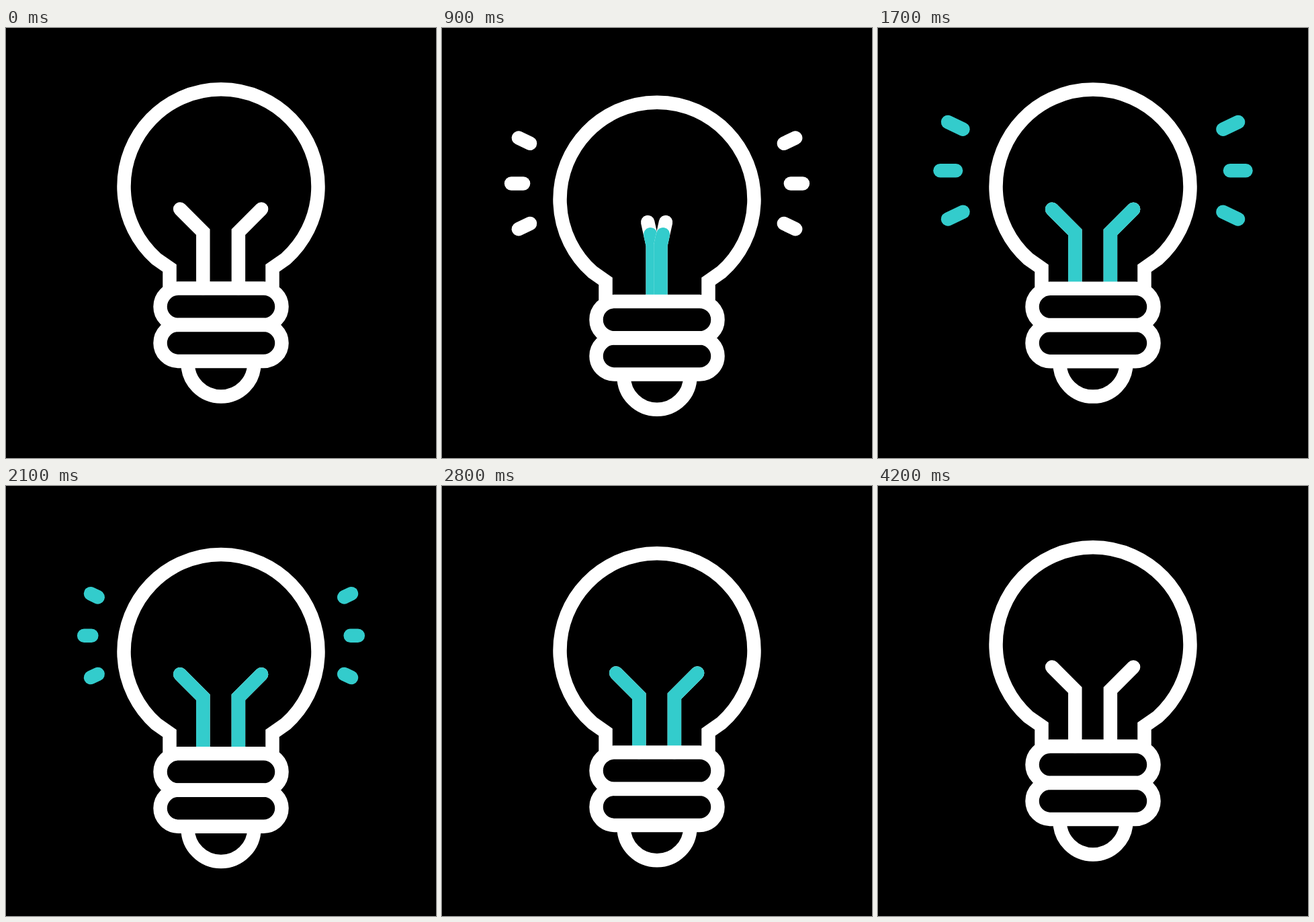
Recreate the animation shown at these times as an HTML page. Size 640 by 640 pixels, loop 4.3 s.

```html
<!DOCTYPE html>
<html lang="en">
<head>
<meta charset="utf-8">
<title>Light bulb</title>
<style>
  html, body { margin: 0; width: 100%; height: 100%; overflow: hidden; background: #000; }
  svg { display: block; width: 100vw; height: 100vh; }
  path, rect { fill: none; stroke-width: 20.5; }
  .white { stroke: #fff; }
  .teal { stroke: #3cc; }
  .round { stroke-linecap: round; }
</style>
</head>
<body>
<svg viewBox="0 0 640 640">
  <g id="lamp">
    <g id="rays"></g>
    <g id="wires"></g>
    <path class="white" d="M243.5 388V357.4L224 343.8A144.5 144.5 0 1 1 416 343.8L396.5 357.4V388"/>
    <rect class="white" x="229.5" y="387.5" width="181" height="54.5" rx="27.2"/>
    <rect class="white" x="229.5" y="441.8" width="181" height="54.2" rx="27.1"/>
    <path class="white" d="M270.6 496V499A49.4 49.4 0 0 0 369.4 499V496"/>
  </g>
</svg>
<script>
const LOOP = 4300, STEP = 100, DROP = 21.8;
const $ = id => document.getElementById(id);

const ramp = (t, a, b) => Math.min(1, Math.max(0, (t - a) / (b - a)));
const ease = (t, a, b) => (1 - Math.cos(Math.PI * ramp(t, a, b))) / 2;
const mix = (a, b, k) => a + (b - a) * k;

function addPath(parent, color) {
  const p = document.createElementNS("http://www.w3.org/2000/svg", "path");
  p.setAttribute("class", color + " round");
  p.setAttribute("pathLength", 1);
  parent.appendChild(p);
  return p;
}

// Shows only the first part of a path.
function trim(path, part) {
  path.style.display = part > 0.001 ? "" : "none";
  path.setAttribute("stroke-dasharray", part < 0.999 ? part + " 2" : "none");
}

const pair = parent => ["white", "teal"].map(c => addPath(parent, c));

// Each ray: birth point, inner end, outer end, as offsets from the axis.
const rays = [];
for (const side of [-1, 1]) {
  for (const [from, inner, outer] of [
    [[174, 158.5], [193.5, 150.5], [216, 139.8]],
    [[182.4, 212], [204, 212], [227.5, 212]],
    [[174, 265.5], [193.5, 273.5], [216, 284.2]]
  ]) rays.push({ side, from, inner, outer, paths: pair($("rays")) });
}

const wires = [-1, 1].map(side => ({ side, paths: pair($("wires")) }));

function draw(t) {
  const down = ease(t, 245, 1080);
  const drop = down - ease(t, 1080, 1740) + ease(t, 1740, 2470) - ease(t, 2470, 3060);
  $("lamp").setAttribute("transform", `translate(0 ${(DROP * drop).toFixed(2)})`);

  const spread = 1 - 0.875 * (down - ease(t, 1080, 1700));
  const glow = ease(t, 245, 1130) - ease(t, 3060, 4140);
  for (const { side, paths } of wires) {
    const x = d => (319.6 + side * d * spread).toFixed(2);
    const d = `M${x(26.3)} 387V303.8L${x(60.5)} 269.6`;
    paths.forEach(p => p.setAttribute("d", d));
    trim(paths[1], glow);
  }

  const grow = ramp(t, 280, 1090) - ramp(t, 1780, 2390);
  const tint = t < 1780 ? ease(t, 1090, 1650) : 1;
  for (const { side, from, inner, outer, paths } of rays) {
    const at = end => {
      const x = 320 + side * mix(from[0], end[0], grow);
      return `${x.toFixed(2)} ${mix(from[1], end[1], grow).toFixed(2)}`;
    };
    const d = `M${at(inner)}L${at(outer)}`;
    paths.forEach(p => p.setAttribute("d", d));
    trim(paths[0], grow > 0 && tint < 1 ? 1 : 0);
    trim(paths[1], grow > 0 ? tint : 0);
  }
}

const start = performance.now();
function tick() {
  const t = (performance.now() - start) % LOOP;
  draw(Math.floor(t / STEP) * STEP);
  requestAnimationFrame(tick);
}
tick();
</script>
</body>
</html>
```
